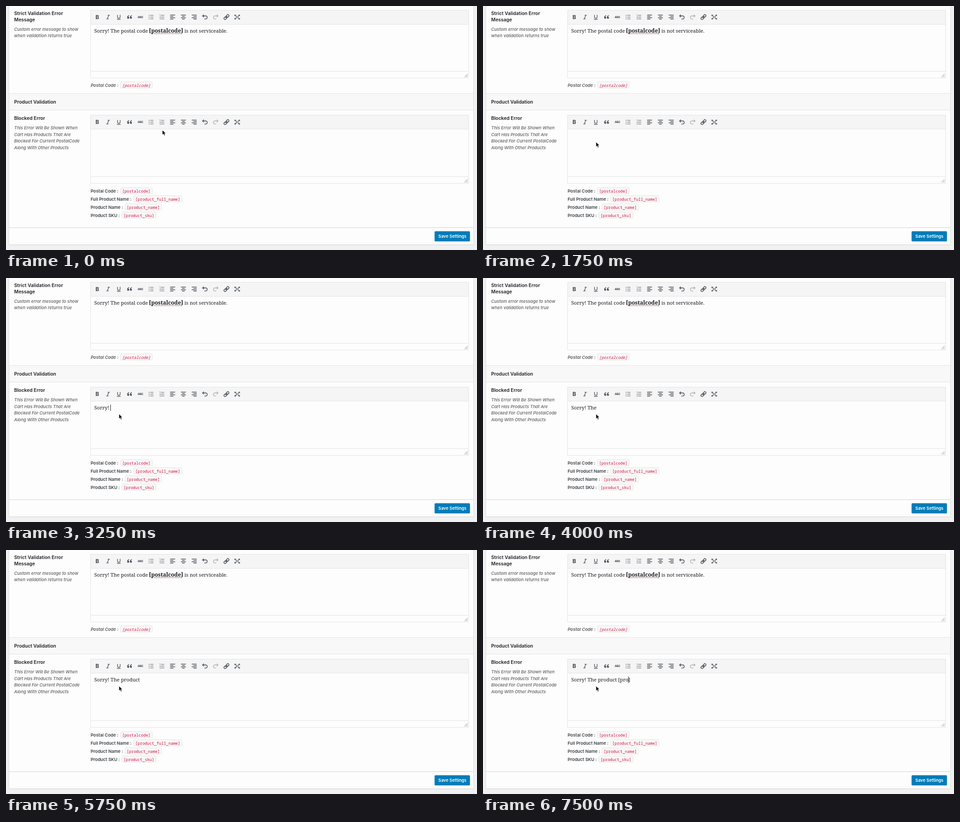
An HTML page that plays this animation: 1038x540 px, repeating every 8000 ms.

```html
<!DOCTYPE html>
<html lang="en">
<head>
<meta charset="utf-8">
<title>Validation settings</title>
<style>
html, body { margin: 0; width: 100%; height: 100%; overflow: hidden; background: #f1f1f1; }
svg { display: block; width: 1038px; height: 540px; }
text { font-family: Inter, "Open Sans", sans-serif; white-space: pre; }
.head { font-size: 10.45px; font-weight: 600; fill: #1b1e22; }
.desc { font-size: 9.45px; font-weight: 500; font-style: italic; fill: #5c5c5c; }
.label { font-size: 9.6px; font-weight: 600; fill: #3c4146; }
.code { font: 500 8.72px "Noto Sans Mono", monospace; fill: #cc1442; }
.it { font-style: italic; }
.label.it { fill: #5a5a5a; }
.body { font: 11.15px "Noto Serif", serif; fill: #1c1c22; }
.strong { font-size: 12px; font-weight: 700; }
.save { font-size: 9.4px; font-weight: 600; fill: #fff; }
.line { fill: none; stroke: #e3e3e3; }
.icon { fill: none; stroke: #50565f; stroke-width: 1.6; }
.icon .solid { fill: #50565f; stroke: none; }
.caret { stroke: #222; }
</style>
</head>
<body>
<svg id="stage" viewBox="0 0 1038 540"></svg>
<script>
const LOOP = 8000;
const stage = document.getElementById('stage');

const text = (x, y, cls, str) => `<text x="${x}" y="${y}" class="${cls}">${str}</text>`;
const path = (d, extra = '') => `<path d="${d}" ${extra}/>`;
const rows = (lines) => path(lines.map(([x1, x2, y]) => `M${x1} ${y}H${x2}`).join(''));

const quote = 'M-.8-4.4C-4-3.6-5.5-1.2-5.3 1.6a2.3 2.3 0 1 0 2.6-2.4C-2.6-2-2-3-.6-3.6Z';
const turn = 'M-2.4-5.5L-5.2-2.6L-2.4.3M-5-2.6H1.6a3.4 3.4 0 0 1 0 6.9H-1.2';
const bars = (short) => rows([[-5.5, 5.5, -4.5], [...short, -1.5], [-5.5, 5.5, 1.5], [...short, 4.5]]);
const listRows = `<g stroke-width="1">${rows([[-2, 5.2, -4], [-2, 5.2, 0], [-2, 5.2, 4]])}</g>`;
const corner = path('M-6-5.2H-2.4L-6-1.8Z', 'class="solid"') + path('M-4.5-3.9L-.8-.6');

const icons = [
  '<text x="-4" y="4.3" class="solid" font-size="11.8" font-weight="800">B</text>',
  path('M-1-4.1H3.9M-3.9 4.1H1M1.6-4.1L-1.6 4.1', 'stroke-width="1.4"'),
  path('M-2.9-4.7V-.3a2.9 2.9 0 0 0 5.8 0V-4.7M-4 5H4', 'stroke-width="1.4"'),
  path(quote, 'class="solid"') + path(quote, 'class="solid" transform="translate(6)"'),
  '<text x="-5.7" y="2.2" class="solid" font-size="5.6" font-weight="700">ABC</text>' + path('M-6.2.2H6.2', 'stroke-width=".8"'),
  listRows + path('M-5.2-4h1.5M-5.2 0h1.5M-5.2 4h1.5', 'stroke-width="1.5"'),
  listRows +
    [1, 2, 3].map(n => `<text x="-5.4" y="${n * 4 - 6.4}" class="solid" font-size="4.4">${n}</text>`).join(''),
  bars([-5.5, 1.6]),
  bars([-3, 3]),
  bars([-1.6, 5.5]),
  path(turn),
  path(turn, 'transform="scale(-1 1)" opacity=".4"'),
  '<g transform="rotate(-45)"><rect x="-6.8" y="-2.4" width="7" height="4.8" rx="2.4"/>' +
    '<rect x="-.2" y="-2.4" width="7" height="4.8" rx="2.4"/><path d="M-3 0H3"/></g>',
  ['1 1', '-1 1', '1 -1', '-1 -1'].map(s => `<g transform="scale(${s})">${corner}</g>`).join('')
];

// Rich text box: toolbar, writing area and status bar
function editor(top, bar, status, bottom, iconY) {
  const tools = icons.map((art, i) =>
    `<g class="icon" transform="translate(${201.2 + i * 23.72} ${iconY})">${art}</g>`).join('');
  return `<rect x="186.5" y="${top}" width="833" height="${bottom - top}" fill="#fdfdfd"/>
    <rect x="186.5" y="${top}" width="833" height="${bar - top}" fill="#f5f5f5"/>
    <rect class="line" x="186.5" y="${top}" width="833" height="${bottom - top}"/>
    <path class="line" d="M187 ${bar}H1019M187 ${status}H1019"/>
    <path d="M1010 ${bottom - 2}l7.5-7.5M1013 ${bottom - 2}l4.5-4.5M1016 ${bottom - 2}l1.5-1.5" stroke="#999"/>${tools}`;
}

function shortcode(x, y, label, code, slant = '') {
  const width = code.length * 5.23 + 7;
  return text(186.5, y, 'label ' + slant, label + ' :') +
    `<rect x="${x}" y="${y - 11}" width="${width}" height="14" rx="2.5" fill="#f8f8f8" stroke="#e3e3e3"/>` +
    text(x + 3.2, y - .2, 'code ' + slant, code);
}

const column = (y, step, cls, lines) =>
  lines.map((str, i) => text(18, y + i * step, cls, str)).join('');

stage.innerHTML = `
  <rect width="1038" height="540" fill="#f1f1f1"/>
  <rect x="6.5" y="-5.5" width="1024" height="534" fill="#fdfdfd" stroke="#dcdcdc"/>
  <rect x="7" y="193.5" width="1023" height="37" fill="#f8f8f8"/>
  <path class="line" d="M7 193.5H1030M7 230.5H1030"/>
  <path d="M7 490.5H1030M7 528.5H1030" stroke="#d2d2d2"/>
  ${column(20, 13.6, 'head', ['Strict Validation Error', 'Message'])}
  ${column(54.7, 14.2, 'desc', ['Custom error message to show', 'when validation returns true'])}
  ${editor(9.5, 40.5, 144.5, 159.5, 24.5)}
  ${text(194.5, 59.4, 'body', 'Sorry! The postal code')}
  ${text(315, 59.4, 'body strong', '[postalcode]')}
  ${text(393.2, 59.4, 'body', 'is not serviceable.')}
  <path d="M320 61.2H388" stroke="#e0202a" stroke-width="1.5" stroke-dasharray="1.5 1.5"/>
  ${shortcode(252.5, 178.7, 'Postal Code', '[postalcode]', 'it')}
  ${text(18, 215.6, 'head', 'Product Validation')}
  ${text(18, 251.8, 'head', 'Blocked Error')}
  ${column(273.4, 14.5, 'desc', ['This Error Will Be Shown When', 'Cart Has Products That Are',
    'Blocked For Current PostalCode', 'Along With Other Products'])}
  ${editor(241.5, 272.5, 377.5, 392.5, 257)}
  ${shortcode(252.5, 412.7, 'Postal Code', '[postalcode]')}
  ${shortcode(281.5, 430.7, 'Full Product Name', '[product_full_name]')}
  ${shortcode(262.5, 448.7, 'Product Name', '[product_name]')}
  ${shortcode(255.5, 466.7, 'Product SKU', '[product_sku]')}
  <rect x="944.5" y="498.5" width="78" height="22.5" rx="2" fill="#007cba"/>
  ${text(952.8, 513.4, 'save', 'Save Settings')}
  <path id="oldCaret" class="caret" d="M412.5 48V62"/>
  <text id="typed" class="body" x="194.5" y="291.4"></text>
  <path id="caret" class="caret" d="M.5 280V294"/>
  <path id="pointer" d="M.5.5V11.2L3 8.9L4.8 13L6.8 12.1L5 8.2H8.4Z" fill="#000" stroke="#fff" stroke-width=".8"/>`;

const [oldCaret, typed, caret, pointer] =
  ['oldCaret', 'typed', 'caret', 'pointer'].map(id => document.getElementById(id));

// Start time, x, y
const moves = [[0, 344, 274], [250, 289, 331], [500, 290.5, 321], [750, 279, 311], [1000, 248.5, 300.5]];

// Start time, content with | as the caret
const typing = [
  [0, ''], [1250, '|'], [1750, ''], [2000, 'S|'], [2250, 'So|'], [2500, 'Sorry|'], [3000, 'Sorry!'],
  [3250, 'Sorry! |'], [3500, 'Sorry! T|'], [3750, 'Sorry! The|'], [4000, 'Sorry! The'],
  [4500, 'Sorry! The pr|'], [4750, 'Sorry! The prod|'], [5000, 'Sorry! The produ|'],
  [5250, 'Sorry! The product |'], [5750, 'Sorry! The product '], [6000, 'Sorry! The product [|'],
  [6250, 'Sorry! The product ['], [6500, 'Sorry! The product [|]'], [7000, 'Sorry! The product []'],
  [7500, 'Sorry! The product [pro|]']
];

const at = (list, t) => list.findLast(step => step[0] <= t);
const show = (el, on) => el.setAttribute('visibility', on ? 'visible' : 'hidden');

function draw(t) {
  const [, x, y] = at(moves, t);
  pointer.setAttribute('transform', `translate(${x} ${y})`);
  show(oldCaret, t >= 750 && t < 1250);

  const content = at(typing, t)[1];
  const pos = content.indexOf('|');
  typed.textContent = content.replace('|', '');
  show(caret, pos >= 0);
  if (pos >= 0) {
    const width = pos ? typed.getSubStringLength(0, pos) : 0;
    caret.setAttribute('transform', `translate(${Math.floor(194.5 + width)})`);
  }
}

const start = performance.now();
function tick() {
  draw((performance.now() - start) % LOOP);
  requestAnimationFrame(tick);
}
tick();
</script>
</body>
</html>
```
